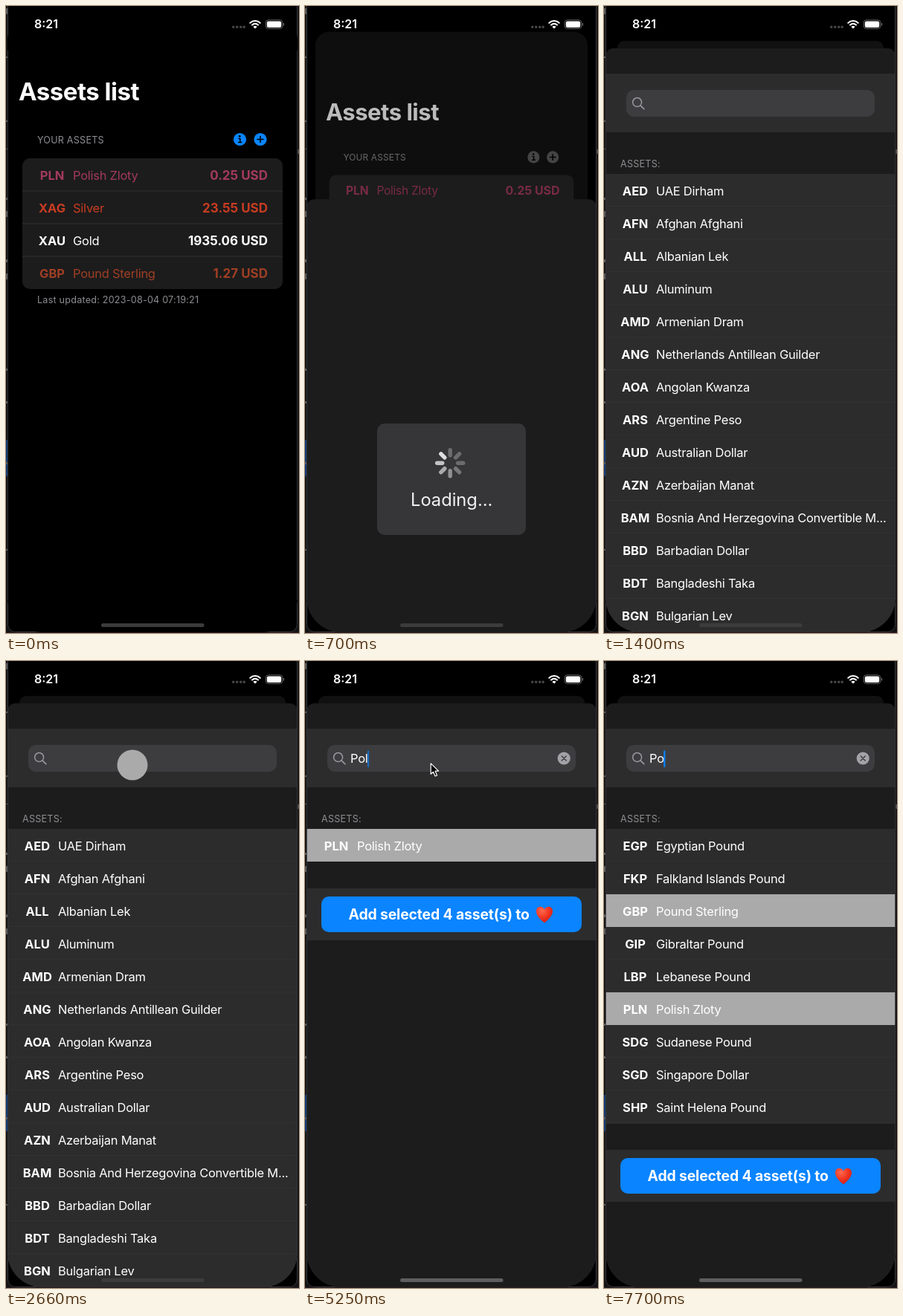
These frames come from a looping animation (394x844 px, 8 s). An HTML page:

```html
<!DOCTYPE html>
<html lang="en">
<head>
<meta charset="utf-8">
<title>Assets list</title>
<style>
  html, body { margin: 0; width: 100%; height: 100%; overflow: hidden; background: #000; }
  svg { display: block; width: 394px; height: 844px; }
  text { font-family: Inter, "Liberation Sans", sans-serif; fill: #fff; white-space: pre; }
  .row { font-size: 16.5px; letter-spacing: -.26px; }
  .code { font-size: 16.5px; font-weight: 700; text-anchor: middle; }
  .price { font-size: 17px; font-weight: 700; text-anchor: end; }
  .small { font-size: 12.6px; letter-spacing: .22px; fill: #8e8e93; }
  .title { font-size: 33px; font-weight: 700; letter-spacing: -.5px; }
  .clock { font-size: 16px; font-weight: 600; }
  .load { font-size: 23.7px; text-anchor: middle; fill: #f2f2f2; }
  .cta { font-size: 19.4px; font-weight: 700; letter-spacing: -.15px; }
</style>
</head>
<body>
<svg id="stage" viewBox="0 0 394 844"></svg>
<script>
const LOOP = 8000, STEP = 70, ROW = 44, TOP = 226;

const mine = [
  ['PLN', 'Polish Zloty', '0.25', '#a33a5e'],
  ['XAG', 'Silver', '23.55', '#c93c22'],
  ['XAU', 'Gold', '1935.06', '#ffffff'],
  ['GBP', 'Pound Sterling', '1.27', '#a03f24']
];
const names = {
  AED: 'UAE Dirham', AFN: 'Afghan Afghani', ALL: 'Albanian Lek', ALU: 'Aluminum',
  AMD: 'Armenian Dram', ANG: 'Netherlands Antillean Guilder', AOA: 'Angolan Kwanza',
  ARS: 'Argentine Peso', AUD: 'Australian Dollar', AZN: 'Azerbaijan Manat',
  BAM: 'Bosnia And Herzegovina Convertible M...', BBD: 'Barbadian Dollar',
  BDT: 'Bangladeshi Taka', BGN: 'Bulgarian Lev', EGP: 'Egyptian Pound',
  FKP: 'Falkland Islands Pound', GIP: 'Gibraltar Pound', LBP: 'Lebanese Pound',
  SDG: 'Sudanese Pound', SGD: 'Singapore Dollar', SHP: 'Saint Helena Pound',
  GBP: 'Pound Sterling', PLN: 'Polish Zloty'
};
const all = Object.keys(names).slice(0, 14);
const onlyPol = ['PLN'];
const onlyPo = ['EGP', 'FKP', 'GBP', 'GIP', 'LBP', 'PLN', 'SDG', 'SGD', 'SHP'];
const picked = ['PLN', 'GBP'];

const text = (cls, x, y, s, fill) =>
  `<text class="${cls}" x="${x}" y="${y}"${fill ? ` style="fill:${fill}"` : ''}>${s}</text>`;
const rect = (x, y, w, h, fill, rx = 0, more = '') =>
  `<rect x="${x}" y="${y}" width="${w}" height="${h}" rx="${rx}" fill="${fill}" ${more}/>`;
const line = (d, color, w) =>
  `<path d="${d}" fill="none" stroke="${color}" stroke-width="${w}" stroke-linecap="round"/>`;

const mineRow = ([code, name, price, color], i) => {
  const y = 233.5 + i * ROW;
  return text('code', 62, y, code, color) + text('row', 90, y, name, color) +
    text('price', 352, y, price + ' USD', color) +
    (i ? rect(22, 205 + i * ROW - .5, 350, 1, '#303033') : '');
};

const home = `
  <rect id="homeBg" x="2" y="0" width="390" height="900"/>
  ${text('title', 17, 127, 'Assets list')}
  ${text('small', 42, 184.5, 'YOUR ASSETS')}
  <g id="info"><circle class="tint" cx="314.5" cy="179.5" r="8.6"/>
    <circle cx="314.2" cy="175.3" r="1.4"/>${line('M312.9 178.6H314.8V183.4M312.6 183.6H316.8', '#000', 1.5)}</g>
  <g id="plus"><circle class="tint" cx="342" cy="179.5" r="8.6"/>
    ${line('M338 179.5H346M342 175.5V183.5', '#000', 1.6)}</g>
  <rect id="card" x="22" y="205" width="350" height="176" rx="10"/>
  ${mine.map(mineRow).join('')}
  ${text('small', 42, 399.5, 'Last updated: 2023-08-04 07:19:21')}
  <rect id="dim" x="0" y="0" width="394" height="900" fill="#000"/>`;

const spokes = Array.from({ length: 8 }, (_, i) =>
  `<path class="spoke" d="M0 -10.5V-17.5" stroke="#fff" stroke-width="5.4" stroke-linecap="round" transform="rotate(${i * 45})"/>`).join('');

const loading = `<g id="loading">
  ${rect(97, 301.7, 200, 150, '#363638', 10)}
  <g transform="translate(195.2 355)">${spokes}</g>
  ${text('load', 197.2, 412.3, 'Loading...')}</g>`;

const assetRow = code => {
  const on = picked.includes(code);
  return `<g data-code="${code}">${rect(2, 0, 390, ROW, on ? '#aaaaaa' : '#2c2c2d')}
    ${on ? '' : rect(2, ROW - .5, 390, 1, '#373739')}
    ${text('code', 42, 29, code)}${text('row', 70, 29, names[code])}</g>`;
};

const footer = `<g id="footer">
  ${rect(2, 0, 390, 70, '#2c2c2d')}
  ${rect(22, 11, 350, 48, '#0a84ff', 10)}
  ${text('cta', 58.5, 42, 'Add selected 4 asset(s) to')}
  <path fill="url(#heart)" d="M322 46.5C313 39.5 311 34.5 311 30.8C311 26.8 313.7 24.8 316.5 24.8
    C319 24.8 321 26.3 322 28.8C323 26.3 325 24.8 327.5 24.8C330.3 24.8 333 26.8 333 30.8C333 34.5 331 39.5 322 46.5Z"/></g>`;

const picker = `<g id="picker">
  ${rect(2, 92, 390, 78, '#2c2c2d')}
  ${rect(2, 91.5, 390, 1, '#333335')}
  ${rect(30, 113, 334, 36, '#3d3d40', 10)}
  <circle cx="44.6" cy="129.6" r="6" fill="none" stroke="#98989d" stroke-width="1.5"/>
  ${line('M49.2 134.2L53.8 138.6', '#98989d', 1.7)}
  <text id="query" class="row" x="61" y="137"></text>
  <rect id="caret" y="120.5" width="2.2" height="22.5" rx="1" fill="#0a84ff"/>
  <g id="clear"><circle cx="348.2" cy="131" r="8.6" fill="#a2a2a7"/>
    ${line('M345.2 128L351.2 134M351.2 128L345.2 134', '#3d3d40', 1.5)}</g>
  ${text('small', 22, 217, 'ASSETS:')}
  ${Object.keys(names).map(assetRow).join('')}
  ${footer}</g>`;

const status = `
  ${text('clock', 38, 30.3, '8:21')}
  ${[305.7, 310.7, 315.7, 320.2].map(x => `<circle cx="${x}" cy="28.3" r="1.7" fill="#48484a"/>`).join('')}
  ${line('M328.3 22.7A9.6 9.6 0 0 1 341.7 22.7M331 25.5A5.8 5.8 0 0 1 339 25.5', '#fff', 2.1)}
  <path d="M335 30.6L332.4 27.9A3.8 3.8 0 0 1 337.6 27.9Z" fill="#fff"/>
  ${rect(349.2, 18.9, 22.6, 11.6, 'none', 3.6, 'stroke="#666"')}
  ${rect(350.8, 20.4, 19.4, 8.6, '#fff', 2.2)}
  ${rect(372.8, 22.8, 1.3, 3.8, '#666', .7)}`;

const mark = ([x, y, h]) => rect(x, y, 2, h, '#58585a');
const desk = rect(0, 0, 394, 844, '#141416') + rect(0, 584, 3, 49, '#123a75') +
  [[0, 3, 8], [0, 68, 2], [0, 154, 2], [0, 192, 1], [0, 258, 3], [0, 276, 8], [0, 341, 4],
   [0, 360, 8], [0, 488, 3], [0, 532, 3], [0, 614, 3], [0, 731, 2], [392.5, 193, 6]].map(mark).join('') +
  rect(0, 843, 394, 1, '#2a1a1e');

const stage = document.getElementById('stage');
stage.innerHTML = `
  <defs>
    <clipPath id="screen"><rect x="2" y="-100" width="390" height="943" rx="47"/></clipPath>
    <radialGradient id="heart" cx=".35" cy=".25" r=".9">
      <stop offset="0" stop-color="#ff6a50"/><stop offset=".5" stop-color="#f0341f"/><stop offset="1" stop-color="#c01a14"/>
    </radialGradient>
  </defs>
  ${desk}
  ${rect(2.5, -20, 389, 862.5, '#000', 10, 'stroke="#3a3a3c"')}
  <g clip-path="url(#screen)">
    <g id="home">${home}</g>
    <g id="sheet">${rect(2, 0, 390, 900, '#1c1c1c', 10)}${loading}</g>
    ${picker}
    ${rect(2, 60, .8, 740, '#3a3a3c')}${rect(391.2, 60, .8, 740, '#3a3a3c')}
  </g>
  ${status}
  <rect id="bar" x="128" y="831" width="138.5" height="5" rx="2.5"/>
  <circle id="touch" r="20.5" fill="#aaaaaa"/>
  <path id="arrow" d="M.8 .8V15.2L4.1 12.2L6.6 18L9.2 16.9L6.7 11.2H11.2Z" fill="#000"
    stroke="#fff" stroke-width="1.2" stroke-linejoin="round"/>`;

const $ = id => document.getElementById(id);
const set = (el, attrs) => { for (const k in attrs) el.setAttribute(k, attrs[k]); };
const show = (el, on) => set(el, { visibility: on ? 'visible' : 'hidden' });
const mix = (a, b, p) => a + (b - a) * p;
const gray = v => `rgb(${v},${v},${v})`;
const move = (x, y) => ({ transform: `translate(${x} ${y})` });
const rows = [...stage.querySelectorAll('[data-code]')];
const spokeEls = [...stage.querySelectorAll('.spoke')];
const tints = [...stage.querySelectorAll('.tint')];

// Remaining share of the sheet's travel, a heavily damped spring
function travel(t) {
  const x = Math.max(0, t - 521) * .0216;
  return (1 + x + x * x / 2) * Math.exp(-x);
}

function drawSheet(t) {
  const left = travel(t), p = 1 - left;
  const top = 57 + 787 * left;
  set($('home'), { transform: `translate(197 ${47 * p}) scale(${1 - .082 * p}) translate(-197 0)` });
  set($('homeBg'), { fill: gray(26 * p), rx: mix(47, 10, p) });
  set($('card'), { fill: gray(28 + 14 * p) });
  set($('dim'), { opacity: .36 * p });
  const k = Math.min(1, p * 1.5);
  tints.forEach(el => set(el, { fill: `rgb(${mix(10, 92, k)},${mix(132, 92, k)},${mix(255, 94, k)})` }));
  set($('plus'), { opacity: t >= 350 && t < 560 ? .4 : 1 });
  set($('sheet'), move(0, top));
  show($('loading'), t < 1190);
  const head = Math.floor((t + 250) / 125);
  spokeEls.forEach((el, i) => {
    const age = ((head - i) % 8 + 8) % 8;
    set(el, { opacity: Math.max(.27, .84 - age * .13) });
  });
}

// Full for a while, then blinking with short fades
function blink(age) {
  if (age < 910) return 1;
  const u = (age - 910) % 1050;
  return u < 350 ? Math.max(0, (140 - u) / 210) : Math.min(1, (u - 280) / 210);
}

function drawSearch(t) {
  const word = t < 3990 ? '' : t < 4060 ? 'P' : t < 4340 || t >= 7210 ? 'Po' : 'Pol';
  const query = $('query');
  if (query.textContent !== word) query.textContent = word;
  const touched = [2660, 3990, 4060, 4340, 7210].filter(s => s <= t).pop();
  set($('caret'), {
    x: 61 + (word ? query.getComputedTextLength() - .6 : 0),
    opacity: t < 2940 ? 0 : blink(t - touched)
  });
  set($('clear'), { opacity: word ? 1 : 0 });
}

function drawList(t) {
  const late = t >= 7560;
  const from = late ? onlyPol : all;
  const to = late ? onlyPo : onlyPol;
  const p = late ? [.4, .8][(t - 7560) / STEP] || 1 : t < 4690 ? 0 : t < 4760 ? .6 : 1;
  rows.forEach(el => {
    const a = from.indexOf(el.dataset.code), b = to.indexOf(el.dataset.code);
    const at = a < 0 ? b : b < 0 ? a : mix(a, b, p);
    const alpha = a < 0 ? (b < 0 ? 0 : p) : b < 0 ? 1 - p : 1;
    set(el, { ...move(0, TOP + at * ROW), opacity: alpha });
  });
  set($('footer'), move(0, TOP + 36 + ROW * mix(from.length, to.length, p)));
}

function render(t) {
  drawSheet(t);
  const open = t >= 1190;
  set($('picker'), { display: open ? 'inline' : 'none' });
  if (open) { drawSearch(t); drawList(t); }
  set($('bar'), { fill: t < 4690 ? '#3c3c3c' : '#5e5e60' });

  const first = t >= 350 && t < 490;
  show($('touch'), first || (t >= 2660 && t < 2730));
  set($('touch'), first ? { cx: 342, cy: 182 } : { cx: 170, cy: 140 });
  const early = t >= 840 && t < 1400;
  show($('arrow'), early || (t >= 4340 && t < 5320));
  set($('arrow'), early ? move(340.4, 179) : move(168.4, 137));
}

function tick() {
  const t = performance.now() % LOOP;
  render(Math.floor(t / STEP + 1e-6) * STEP);
  requestAnimationFrame(tick);
}
tick();
</script>
</body>
</html>
```
